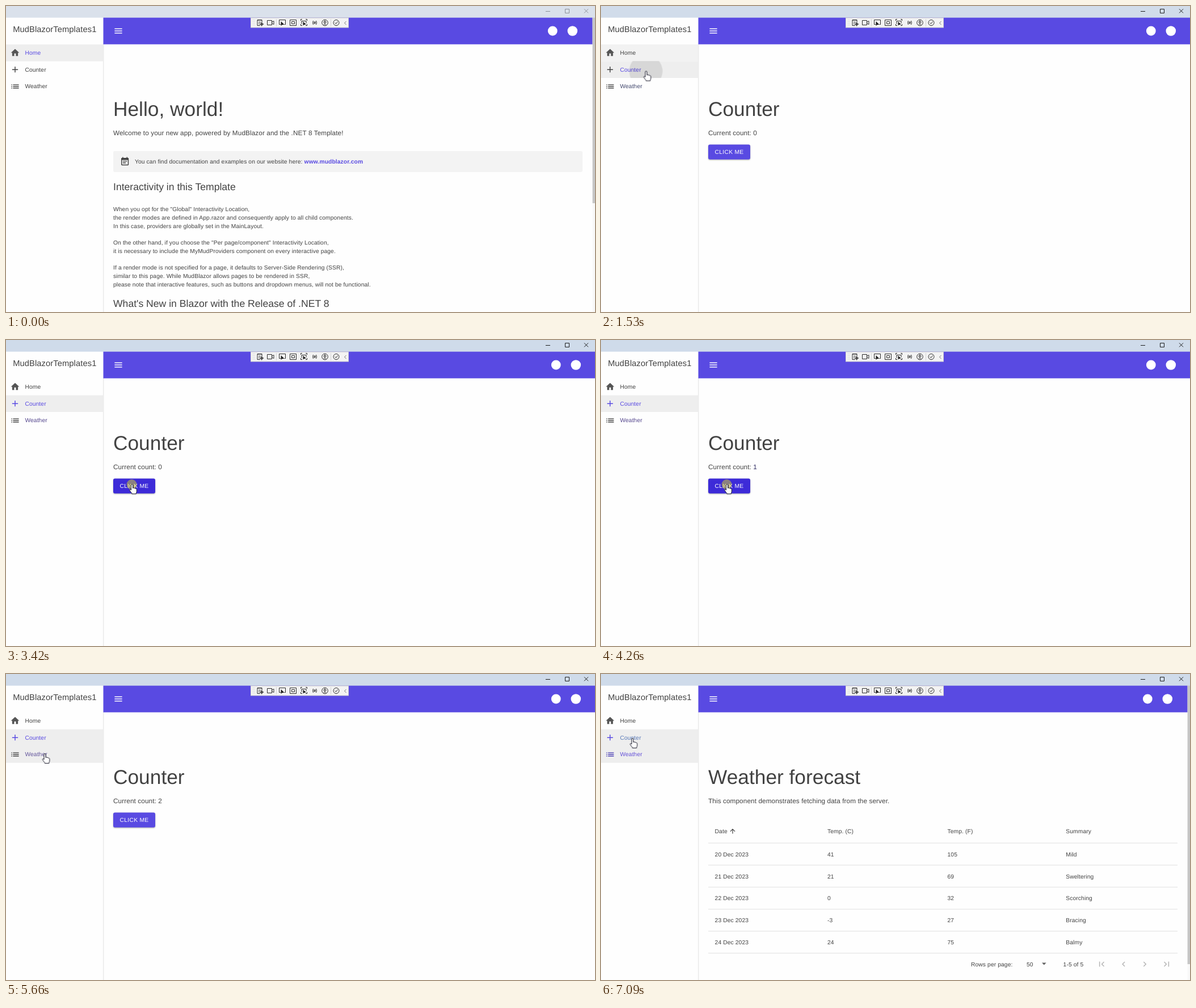
Recreate the animation shown at these times as an HTML page. Size 1038x540 px, loop 8 s.

```html
<!DOCTYPE html>
<html lang="en">
<head>
<meta charset="utf-8">
<title>Template tour</title>
<style>
html, body { margin: 0; width: 100%; height: 100%; overflow: hidden; background: #fefefe; }
svg { display: block; }
text { font: 10.28px "Liberation Sans", Arial, sans-serif; letter-spacing: .01071em; fill: #424242; text-rendering: geometricPrecision; white-space: pre; }
.h3 { font-size: 35.3px; letter-spacing: 0; }
.h5 { font-size: 17.6px; letter-spacing: 0; }
.h6 { font-size: 14.68px; letter-spacing: .0075em; }
.body1 { font-size: 11.74px; letter-spacing: .00938em; }
.link { font-weight: bold; fill: #594ae2; }
.rule { stroke: #e0e0e0; }
.line { fill: none; stroke: #2b2b2b; }

/* Timeline: 1% = 80 ms */
.anim { animation: 8s linear infinite; }
.step { animation: 8s step-end infinite; }

.home { animation-name: home; }
@keyframes home { 18.25%, to { visibility: hidden } }
.counter { animation-name: counter; }
@keyframes counter { 0% { visibility: hidden } 18.25% { visibility: visible } 71.25%, to { visibility: hidden } }
.weather { animation-name: weather; }
@keyframes weather { 0% { visibility: hidden } 71.25%, to { visibility: visible } }
.loading { animation-name: loading; }
@keyframes loading { 0% { visibility: hidden } 71.25% { visibility: visible } 78.5%, to { visibility: hidden } }
.table { animation-name: table; }
@keyframes table { 0% { visibility: hidden } 78.5%, to { visibility: visible } }
.links { animation-name: links; }
@keyframes links { 0% { transform: none } 18.25% { transform: translateX(6px) } 78.5%, to { transform: none } }

.title { animation-name: title; }
@keyframes title { 0%, 16% { fill: #dae1eb } 20%, to { fill: #cfdbea } }
.caption { fill: none; animation-name: caption; }
@keyframes caption { 0% { stroke: #8c9198 } .875%, to { stroke: #1c1c1c } }

.rowHome { animation-name: rowHome; }
@keyframes rowHome { 0%, 18.25% { opacity: 1 } 21.5%, 99.99% { opacity: 0 } to { opacity: 1 } }
.rowCounter { animation-name: rowCounter; }
@keyframes rowCounter { 0%, 16% { opacity: 0 } 17%, 71.25% { opacity: 1 } 73%, 86.5% { opacity: 0 } 88%, 99.99% { opacity: 1 } to { opacity: 0 } }
.rowWeather { animation-name: rowWeather; }
@keyframes rowWeather { 0%, 64.5% { opacity: 0 } 66%, 99.99% { opacity: 1 } to { opacity: 0 } }

.textHome { animation-name: textHome; }
@keyframes textHome { 0% { fill: #594ae2 } 18.25%, to { fill: #424242 } }
.textCounter { animation-name: textCounter; }
@keyframes textCounter { 0% { fill: #424242 } 16.5% { fill: #5a7ab8 } 18.25% { fill: #594ae2 } 71.25% { fill: #424242 } 87.5%, to { fill: #5a7ab8 } }
.textWeather { animation-name: textWeather; }
@keyframes textWeather { 0%, 18.25% { fill: #424242 } 19%, 21% { fill: #43496e } 26%, 54% { fill: #55478e } 62%, 65% { fill: #4a4070 } 72%, 78% { fill: #685aa6 } 81%, 99.99% { fill: #6552d8 } to { fill: #424242 } }
.plus { animation-name: plus; }
@keyframes plus { 0%, 19.5% { fill: #424242 } 26%, 99.99% { fill: #594ae2 } to { fill: #424242 } }
.list { animation-name: list; }
@keyframes list { 0%, 71.25% { fill: #424242 } 76%, 78% { fill: #3d3478 } 81%, 99.99% { fill: #4a3eb4 } to { fill: #424242 } }

.button { filter: drop-shadow(0 1.3px 1.2px rgba(0, 0, 0, .32)); animation-name: button; }
@keyframes button { 0%, 25.9% { fill: #594ae2 } 29%, 56% { fill: #3d2bd8 } 59.5%, to { fill: #594ae2 } }
.count0 { animation-name: count0; }
@keyframes count0 { 0% { opacity: 1 } 44.5%, to { opacity: 0 } }
.count1 { animation-name: count1; }
@keyframes count1 { 0% { opacity: 0 } 44.5% { opacity: 1 } 54.125%, to { opacity: 0 } }
.count2 { animation-name: count2; }
@keyframes count2 { 0% { opacity: 0 } 54.125%, to { opacity: 1 } }

.ripple1 { animation-name: grow1, fade1; }
@keyframes grow1 { 0%, 17.5% { transform: scale(0); animation-timing-function: ease } 25%, to { transform: scale(1) } }
@keyframes fade1 { 0%, 17.5% { opacity: .11 } 30%, to { opacity: 0 } }
.ripple2 { animation-name: grow2, fade2; }
@keyframes grow2 { 0%, 70.625% { transform: scale(0); animation-timing-function: ease } 78.125%, to { transform: scale(1) } }
@keyframes fade2 { 0%, 70.625% { opacity: .11 } 81%, to { opacity: 0 } }

.spinner { fill: none; stroke: #7f79a5; stroke-width: 2; animation-name: spin, dash; }
@keyframes spin { 0%, 71.25% { transform: rotate(-74deg) } 78.75%, to { transform: rotate(80deg) } }
@keyframes dash {
  0%, 71.25% { stroke-dasharray: .7 133; stroke-dashoffset: 0; animation-timing-function: ease-in-out }
  78.75%, to { stroke-dasharray: 66 133; stroke-dashoffset: -10 }
}

.pointer { animation-name: move; animation-timing-function: ease-in-out; }
@keyframes move {
  0%, 7.9% { transform: translate(430px, 446px); animation-timing-function: ease-out }
  16.5%, 19.8% { transform: translate(79.5px, 114.5px) }
  26.4%, 55% { transform: translate(222px, 254px) }
  62.4%, 63.4% { transform: translate(69.5px, 121px) }
  66.5%, 83.4% { transform: translate(68.5px, 140px) }
  88.5%, to { transform: translate(55.5px, 113px) }
}
.arrow { animation-name: arrow; }
@keyframes arrow { 0% { opacity: 0 } 8% { opacity: 1 } 14% { opacity: 0 } 24% { opacity: 1 } 25.7% { opacity: 0 } 57.4% { opacity: 1 } 59.6%, to { opacity: 0 } }
.hand { animation-name: hand; }
@keyframes hand { 0% { opacity: 0 } 14% { opacity: 1 } 24% { opacity: 0 } 25.7% { opacity: 1 } 57.4% { opacity: 0 } 59.6%, to { opacity: 1 } }
.press { fill: #ff0; animation-name: press; }
@keyframes press {
  0% { opacity: 0 } 16.625% { opacity: .4 } 17.5% { opacity: 0 }
  42.75% { opacity: .4 } 44.5% { opacity: 0 }
  51.5% { opacity: .4 } 54.125% { opacity: 0 }
  69% { opacity: .4 } 70.6%, to { opacity: 0 }
}
</style>
</head>
<body>
<svg width="1038" height="540" viewBox="0 0 1038 540">
  <defs>
    <symbol id="i-home" viewBox="0 0 24 24"><path d="M10 20v-6h4v6h5v-8h3L12 3 2 12h3v8z"/></symbol>
    <symbol id="i-plus" viewBox="0 0 24 24"><path d="M19 13h-6v6h-2v-6H5v-2h6V5h2v6h6z"/></symbol>
    <symbol id="i-list" viewBox="0 0 24 24"><path d="M3 13h2v-2H3zm0 4h2v-2H3zm0-8h2V7H3zm4 4h14v-2H7zm0 4h14v-2H7zM7 7v2h14V7z"/></symbol>
    <symbol id="i-note" viewBox="0 0 24 24"><path d="M17 10H7v2h10zm2-7h-1V1h-2v2H8V1H6v2H5a2 2 0 0 0-2 2v14a2 2 0 0 0 2 2h14a2 2 0 0 0 2-2V5a2 2 0 0 0-2-2zm0 16H5V8h14zm-5-5H7v2h7z"/></symbol>
    <symbol id="i-menu" viewBox="0 0 24 24"><path d="M3 18h18v-2H3zm0-5h18v-2H3zm0-7v2h18V6z"/></symbol>
    <symbol id="i-up" viewBox="0 0 24 24"><path d="M4 12l1.41 1.41L11 7.83V20h2V7.83l5.58 5.59L20 12l-8-8z"/></symbol>
    <path id="p-first" d="M6.4 4.6L1.8 0l4.6-4.6L5-6l-6 6 6 6zM-6-6h2V6h-2z"/>
    <path id="p-prev" d="M3.4-4.6L2-6l-6 6 6 6 1.4-1.4L-1.2 0z"/>
    <clipPath id="clip1"><rect y="97.5" width="171.5" height="29.5"/></clipPath>
    <clipPath id="clip2"><rect y="127" width="171.5" height="29.8"/></clipPath>
  </defs>

  <rect width="1038" height="540" fill="#fefefe"/>

  <!-- Home -->
  <g class="step home">
    <text class="h3" x="189" y="194">Hello, world!</text>
    <text class="body1" x="189" y="227.5">Welcome to your new app, powered by MudBlazor and the .NET 8 Template!</text>
    <rect x="189" y="256" width="827" height="37" rx="3" fill="#f3f3f3"/>
    <use href="#i-note" x="200.8" y="265.8" width="17.6" height="17.6" fill="#424242"/>
    <text x="227" y="278">You can find documentation and examples on our website here: <tspan class="link">www.mudblazor.com</tspan></text>
    <text class="h5" x="189" y="325">Interactivity in this Template</text>
    <text x="189" y="362.4">When you opt for the "Global" Interactivity Location,</text>
    <text x="189" y="377.1">the render modes are defined in App.razor and consequently apply to all child components.</text>
    <text x="189" y="391.8">In this case, providers are globally set in the MainLayout.</text>
    <text x="189" y="421.2">On the other hand, if you choose the "Per page/component" Interactivity Location,</text>
    <text x="189" y="435.9">it is necessary to include the MyMudProviders component on every interactive page.</text>
    <text x="189" y="465.3">If a render mode is not specified for a page, it defaults to Server-Side Rendering (SSR),</text>
    <text x="189" y="480">similar to this page. While MudBlazor allows pages to be rendered in SSR,</text>
    <text x="189" y="494.7">please note that interactive features, such as buttons and dropdown menus, will not be functional.</text>
    <text class="h5" x="189" y="530.6">What's New in Blazor with the Release of .NET 8</text>
  </g>

  <!-- Counter -->
  <g class="step counter">
    <text class="h3" x="189" y="194">Counter</text>
    <text class="body1 step count0" x="189" y="227.5">Current count: 0</text>
    <text class="body1 step count1" x="189" y="227.5">Current count: <tspan fill="#2d2a60">1</tspan></text>
    <text class="body1 step count2" x="189" y="227.5">Current count: 2</text>
    <rect class="anim button" x="189" y="244.4" width="74" height="26.4" rx="3"/>
    <text x="200.6" y="261.4" style="fill:#fff;letter-spacing:.02857em;font-weight:500">CLICK ME</text>
  </g>

  <!-- Weather -->
  <g class="step weather">
    <text class="h3" x="189" y="194">Weather forecast</text>
    <text class="body1" x="189" y="227.5">This component demonstrates fetching data from the server.</text>
  </g>
  <g class="step loading" transform="translate(203.7 270.5)">
    <circle class="anim spinner" r="13.4"/>
  </g>
  <g class="step table">
    <path class="rule" d="M189 298.3H1016M189 337.2H1016M189 376.1H1016M189 415H1016M189 453.9H1016M189 492.6H1016"/>
    <text y="281.2"><tspan x="200.6">Date</tspan><tspan x="399">Temp. (C)</tspan><tspan x="610.5">Temp. (F)</tspan><tspan x="819.3">Summary</tspan></text>
    <use href="#i-up" x="225.3" y="270.7" width="13.4" height="13.4" fill="#333"/>
    <text y="321.6"><tspan x="200.6">20 Dec 2023</tspan><tspan x="399">41</tspan><tspan x="610.5">105</tspan><tspan x="819.3">Mild</tspan></text>
    <text y="360.5"><tspan x="200.6">21 Dec 2023</tspan><tspan x="399">21</tspan><tspan x="610.5">69</tspan><tspan x="819.3">Sweltering</tspan></text>
    <text y="399.4"><tspan x="200.6">22 Dec 2023</tspan><tspan x="399">0</tspan><tspan x="610.5">32</tspan><tspan x="819.3">Scorching</tspan></text>
    <text y="438.3"><tspan x="200.6">23 Dec 2023</tspan><tspan x="399">-3</tspan><tspan x="610.5">27</tspan><tspan x="819.3">Bracing</tspan></text>
    <text y="477.2"><tspan x="200.6">24 Dec 2023</tspan><tspan x="399">24</tspan><tspan x="610.5">75</tspan><tspan x="819.3">Balmy</tspan></text>
    <text y="516"><tspan x="652">Rows per page:</tspan><tspan x="750">50</tspan><tspan x="814.6">1-5 of 5</tspan></text>
    <path d="M777 509.6h7.6l-3.8 3.8z" fill="#616161"/>
    <g fill="#b4b4b4">
      <use href="#p-first" transform="translate(882.3 512) scale(.734)"/>
      <use href="#p-prev" transform="translate(921 512) scale(.734)"/>
      <use href="#p-prev" transform="translate(958.3 512) scale(-.734 .734)"/>
      <use href="#p-first" transform="translate(996.7 512) scale(-.734 .734)"/>
    </g>
  </g>

  <!-- Drawer -->
  <rect y="20" width="171.5" height="520" fill="#fefefe"/>
  <path class="rule" d="M171.8 67V540"/>
  <g fill="#eee">
    <rect class="anim rowHome" y="67.8" width="171.5" height="29.7"/>
    <rect class="anim rowCounter" y="97.5" width="171.5" height="29.5"/>
    <rect class="anim rowWeather" y="127" width="171.5" height="29.8"/>
  </g>
  <text class="h6" x="12.2" y="46">MudBlazorTemplates1</text>
  <use href="#i-home" x="7.2" y="73.6" width="17.6" height="17.6" fill="#555"/>
  <use class="anim plus" href="#i-plus" x="7.2" y="103.4" width="17.6" height="17.6"/>
  <use class="anim list" href="#i-list" x="7.2" y="133" width="17.6" height="17.6"/>
  <text class="step textHome" x="33.4" y="86">Home</text>
  <text class="step textCounter" x="33.4" y="115.8">Counter</text>
  <text class="anim textWeather" x="33.4" y="145.4">Weather</text>
  <g clip-path="url(#clip1)"><g transform="translate(79 115)"><circle class="anim ripple1" r="87"/></g></g>
  <g clip-path="url(#clip2)"><g transform="translate(68.5 141)"><circle class="anim ripple2" r="87"/></g></g>

  <!-- App bar -->
  <rect x="171.5" y="20" width="866.5" height="47.6" fill="#594ae2"/>
  <use href="#i-menu" x="189.2" y="35.2" width="17.6" height="17.6" fill="#fff"/>
  <g class="step links" fill="#fff">
    <circle cx="963.3" cy="44" r="8.4"/>
    <circle cx="998.3" cy="44" r="8.8"/>
  </g>

  <!-- Scrollbars -->
  <g class="step home">
    <rect x="1033.6" y="20" width="4.4" height="520" fill="#f8f8f8"/>
    <rect x="1033.6" y="20" width="4.4" height="328" fill="#c6c6c6"/>
  </g>
  <g class="step table">
    <rect x="1033.6" y="20" width="4.4" height="520" fill="#f8f8f8"/>
    <rect x="1033.6" y="20" width="4.4" height="492" fill="#c6c6c6"/>
  </g>

  <!-- Window frame -->
  <rect class="anim title" width="1038" height="20.6"/>
  <path class="step caption" d="M951 9.5h8M985.5 5.5h7v7h-7zM1019 5.3l7 7M1026 5.3l-7 7"/>

  <!-- Debug toolbar -->
  <rect x="431.5" y="21" width="172" height="17" fill="#f3f3f3" stroke="#cfcfcf"/>
  <path d="M435.5 24v12M438 24v12" stroke="#c4c4c4" stroke-dasharray="1 2"/>
  <path d="M476.5 23v13M572.5 23v13" stroke="#d5d5d5"/>
  <g class="line">
    <path d="M448 34.5h-5v-10h8v4M443 25h8M445 28.5h4M445 31.5h2"/>
    <circle cx="450.6" cy="32" r="2"/>
    <path d="M450.6 28.4v7.2M447 32h7.2"/>
    <path d="M460.5 25.5h8v8h-8zM468.5 28.5l3.5-2v6l-3.5-2"/>
    <path d="M484 32.5h-2.500v-8h11v8h-2"/>
    <path d="M500.500 24.500h11v10h-11zM503.500 27.500h5v4h-5z"/>
    <path d="M521 31.500v-5h8v4M519.500 26v-2.500h2.500M528 23.500h2.500v2.500M519.500 32v2.500h2.500M528 34.500h2.500v-2.500"/>
    <path d="M541.500 26q-2 3.500 0 7M546.500 26q2 3.500 0 7"/>
    <circle cx="544" cy="29.500" r="1.600"/>
    <path d="M542.500 31l3-3"/>
    <circle cx="562" cy="29.500" r="5.300"/>
    <path d="M559 28.300h6M562 28v2.500l-1.800 3M562 30.500l1.800 3"/>
    <circle cx="582" cy="29.500" r="5"/>
    <path d="M579.600 29.500l1.900 2 3-4.200"/>
    <path d="M599.500 27l-3 3 3 3" stroke="#777"/>
  </g>
  <g fill="#1c1c1c">
    <path d="M484.500 27v8l2-1.800 3.800-.4zM523.500 27.500v7l1.900-1.600 3.400-.4z"/>
    <circle cx="562" cy="26.500" r="1"/>
  </g>

  <!-- Pointer -->
  <g class="anim pointer">
    <circle class="step press" cx="-.5" cy="1" r="9"/>
    <g fill="#fff" stroke="#1c1c2c" stroke-linejoin="round">
      <path class="step arrow" d="M0 0v13l3-2.800 2 4.600 1.900-.8-2-4.500h4z"/>
      <path class="step hand" d="M-1.500 11V2a1.500 1.500 0 0 1 3 0V7.500q.3-1 1.400-.8 1 .2 1.100 1.200.4-.8 1.400-.5.9.3.9 1.200.5-.5 1.200-.2.8.3.8 1.400V13q0 2-1 3.200V17.600H-.2V16.500Q-2 14.500-4 11.400-4.600 10-3.400 9.600-2.400 9.500-1.500 11z"/>
    </g>
  </g>
</svg>
</body>
</html>
```
